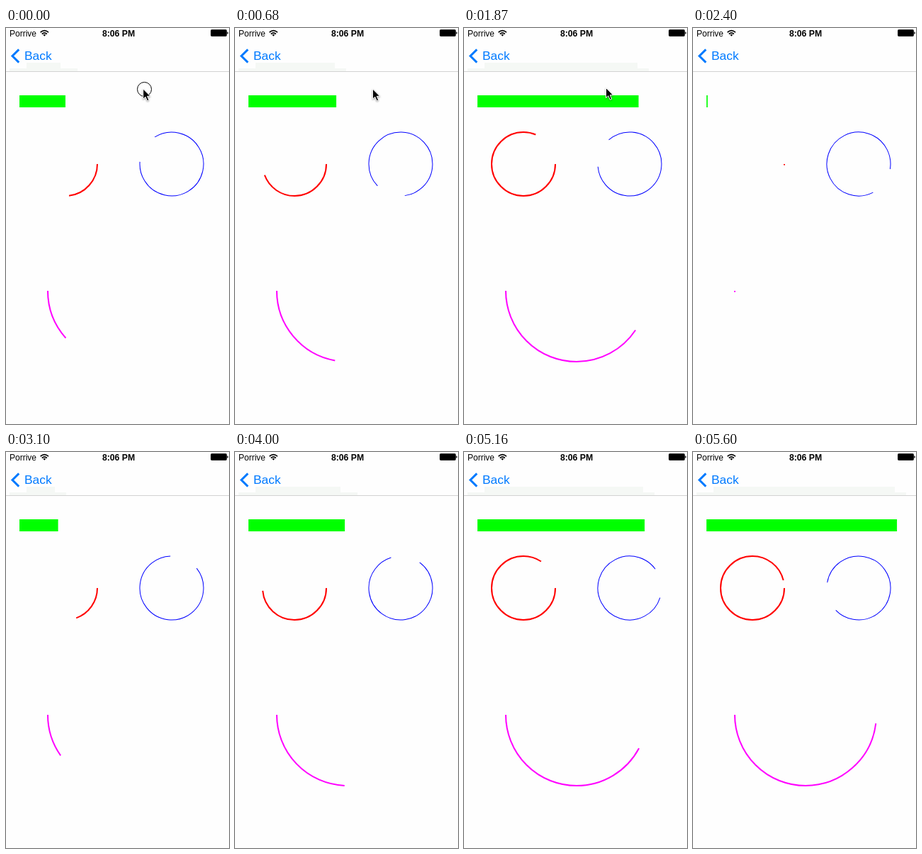
An HTML page that plays this animation: 315 by 559 pixels, repeating every 5.64 s.

```html
<!DOCTYPE html>
<html lang="en">
<head>
<meta charset="utf-8">
<title>Progress shapes</title>
<style>
  html, body { margin: 0; width: 100%; height: 100%; overflow: hidden; background: #fefefe; }
  svg { display: block; width: 315px; height: 559px; }
  text { font-family: "Liberation Sans", Arial, sans-serif; font-size: 12px; }
  .line { fill: none; stroke-width: 2; }
  #pointer { filter: drop-shadow(0 1px 1px #0006); }
</style>
</head>
<body>
<svg viewBox="0 0 315 559">
  <rect width="315" height="559" fill="#fefefe"/>

  <!-- bar colour showing faintly through the navigation bar -->
  <g fill="#f5f8f5">
    <rect id="tintTop" x="29" y="49" height="8"/>
    <rect id="tintLow" x="5" y="57" height="4"/>
  </g>
  <rect y="61" width="315" height="1" fill="#d2d2d2"/>

  <!-- status bar -->
  <text x="5" y="12">Porrive</text>
  <text x="136" y="12" font-weight="bold" style="font-size:12.2px">8:06 PM</text>
  <g fill="none" stroke="#000" stroke-width="1.7">
    <path d="M48.6 6.2Q54.3 1 60 6.2M50.8 8.5Q54.3 5.3 57.8 8.5"/>
    <path d="M52.4 9.6Q54.3 8 56.2 9.6L54.3 11.8Z" fill="#000" stroke="none"/>
  </g>
  <rect x="289.5" y="2.5" width="22" height="9" rx="1" stroke="#222"/>
  <path d="M312.3 5.3q1.5 0 1.5 1.7t-1.5 1.7z"/>

  <!-- back button -->
  <path d="M18.2 30.4L9 39.5L18.2 48.6" fill="none" stroke="#007aff" stroke-width="3"/>
  <text x="26" y="45" fill="#007aff" style="font-size:17.4px">Back</text>

  <rect id="bar" x="19" y="95" height="17" fill="#0f0"/>
  <circle id="ring" class="line" cx="84" cy="192" r="45" pathLength="1" stroke="#f00"/>
  <path id="smile" class="line" d="M59 371A100 100 0 0 0 259 371" pathLength="1" stroke="#f0f"/>
  <circle id="spinner" cx="234" cy="192" r="45" pathLength="1" fill="none" stroke="#00f" stroke-dasharray=".85 .15"/>

  <circle id="tap" cx="195.5" cy="86.5" r="10" fill="none" stroke="#000"/>
  <path id="pointer" d="M0 0V14.2L3.3 11.2L5.8 16.8L8.2 15.7L5.8 10.3H10.2Z" stroke="#fff"/>
</svg>
<script>
  const LOOP = 5640, TICK = 57.3, LEAD = 20, LAST = 98;
  const RESET = 42;                        // tick at which the shapes start over
  const SPIN_START = 238, SPIN_STEP = 21.55; // degrees, degrees per tick
  const TAP_END = 2, POINTER_END = 36;

  // the second fill runs at a slightly uneven pace: [tick, progress]
  const refill = [[RESET, .006], [54, .195], [70, .486], [81, .711], [LAST, .961]];

  const $ = id => document.getElementById(id);
  const set = (id, name, value) => $(id).setAttribute(name, value);
  const show = (id, on) => set(id, "visibility", on ? "visible" : "hidden");
  const snap = x => Math.floor((x - 5) / 8) * 8 + 5;
  const ramp = (x, from, to) => Math.min(1, Math.max(0, (x - from) / (to - from)));

  function progress(tick) {
    if (tick < RESET) return .232 + .0176 * tick;
    let p = refill[0][1];
    for (let i = 1; i < refill.length; i++) {
      const [t0, p0] = refill[i - 1], [t1, p1] = refill[i];
      p += (p1 - p0) * ramp(tick, t0, t1);
    }
    return p;
  }

  function draw(ms) {
    const tick = Math.min(LAST, Math.floor((ms % LOOP + LEAD) / TICK));
    const p = progress(tick);
    const width = 280 * p, end = 19 + width;

    set("bar", "width", width);
    set("ring", "stroke-dasharray", `${p} 2`);
    set("smile", "stroke-dasharray", `${p} 2`);
    set("spinner", "transform", `rotate(${SPIN_START + SPIN_STEP * tick} 234 192)`);

    set("tintTop", "width", Math.max(0, snap(end) - 29));
    set("tintLow", "width", p < .02 ? 0 : snap(end + 19.2) - 5);

    show("tap", tick < TAP_END);
    show("pointer", tick < POINTER_END);
    const x = 193.7 + 6.8 * ramp(tick, 11, 20);
    const y = 86 - 1.5 * ramp(tick, 24, 31);
    set("pointer", "transform", `translate(${x} ${y})`);
  }

  const start = performance.now();
  function loop() {
    draw(performance.now() - start);
    requestAnimationFrame(loop);
  }
  loop();
</script>
</body>
</html>
```
